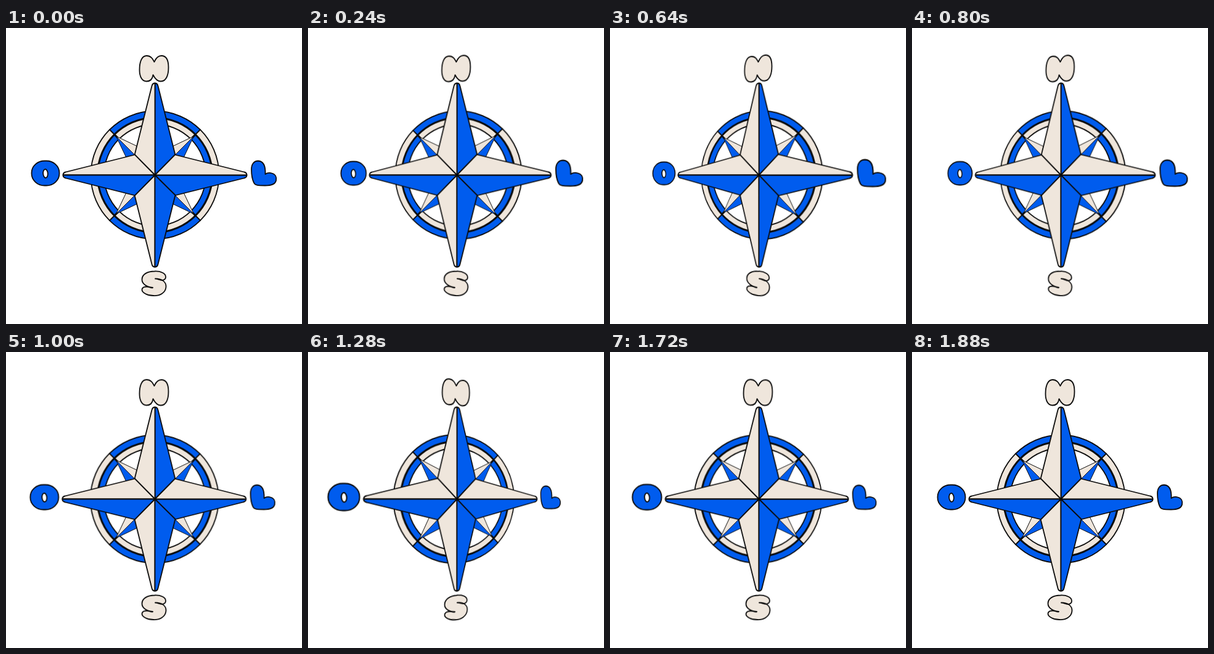
These frames come from a looping animation (480 px wide and 480 px high, 1.92 s). An HTML page:

```html
<!DOCTYPE html>
<html lang="en">
<head>
<meta charset="utf-8">
<title>Swaying compass</title>
<style>
html, body { margin: 0; width: 100%; height: 100%; overflow: hidden; background: #fff; }
svg { display: block; width: 480px; height: 480px; transform-origin: 241.5px 238.5px; }
</style>
</head>
<body>
<svg id="compass" viewBox="0 0 480 480" stroke="#0b0b0b" stroke-width="1.8" stroke-linejoin="round">
  <g id="rose" transform="translate(241.5 238.5)"></g>
  <g fill="#efe6dc">
    <path d="M228 45C235 45 238 50 240.500 55C243 49 247 45 252 45C260 45 263.500 53 263.500 64C263.500 76 260 86.500 251 86.500C245 86.500 241 81 238.500 76C237.500 83 234 86.500 228 86.500C220 86.500 216.500 78 216.500 68C216.500 55 220 45 228 45Z"/>
    <path d="M241 394.500C251 394 259 398 259 403.500C259 409 253 410 248 408Q244 406.500 242 406.500C252 406.500 260 411 259.500 420C258.500 430 249 434.500 239 434C229 434 220.500 429 220.500 424.500C220.500 419.500 228 418.500 233 420.500Q237 422 238 421C228 420 220.500 415 220.500 408C220.500 399 230 394.500 241 394.500Z"/>
  </g>
  <g fill="#005cee">
    <path d="M409 215.500C417 216 421 224 420.500 237C424 234.500 428 234.500 431 235.500C437 237 439 242 438 247C437 253 430 255.500 420 255.500C409 255.500 404 255.500 402 251C399 245 398 237 398 229C398 221 402 215.500 409 215.500Z"/>
    <rect x="41.500" y="215.500" width="45" height="40" rx="21" ry="19.500"/>
    <ellipse cx="64" cy="236" rx="3.800" ry="7" fill="#fff" transform="rotate(-5 64 236)"/>
  </g>
</svg>
<script>
const BLUE = '#005cee', BEIGE = '#efe6dc';
const compass = document.getElementById('compass');

const shape = (d, fill, turn, flip = 1, width = 1.8) =>
  `<path d="${d}" fill="${fill}" stroke-width="${width}" transform="rotate(${turn}) scale(${flip} 1)"/>`;

const sector = r => {
  const k = r * Math.SQRT1_2;
  return `M0 0L${-k} ${-k}A${r} ${r} 0 0 1 ${k} ${-k}Z`;
};

function drawRose() {
  const turns = [0, 90, 180, 270];
  const smallHalf = 'M0 0L0 -33L63 -63Z';
  const bigHalf = 'M0 0L33 -32.500L5 -144.500Q4 -149 0 -149Z';
  const ring = (r, colors, width) =>
    turns.map((a, i) => shape(sector(r), colors[i % 2], a, 1, width)).join('');

  let out = ring(104, [BLUE, BEIGE], 1.8) + ring(93, [BEIGE, BLUE], 3);
  out += '<circle r="82.5" fill="#fff"/>';
  // Each minor point: the upper half is light, the lower half dark.
  turns.forEach((a, i) => {
    out += shape(smallHalf, i < 2 ? BEIGE : BLUE, a, 1, 1);
    out += shape(smallHalf, i === 0 || i === 3 ? BEIGE : BLUE, a, -1, 1);
  });
  turns.forEach((a, i) => {
    out += shape(bigHalf, i < 2 ? BLUE : BEIGE, a);
    out += shape(bigHalf, i < 2 ? BEIGE : BLUE, a, -1);
  });
  document.getElementById('rose').innerHTML = out;
}

// Sway in degrees at 25 steps a second; the ends repeat the cycle for smooth slopes.
const keys = [
  [-5, -7.4], [0, 0], [12, 18.6], [15, 20.2], [20, 12.7], [25, -2.2],
  [28, -13], [32, -20.3], [38, -13.6], [42, -7.4], [47, 0], [59, 18.6]
];

const slope = i =>
  (keys[i + 1][1] - keys[i - 1][1]) / (keys[i + 1][0] - keys[i - 1][0]);

function sway(step) {
  let i = 1;
  while (i < keys.length - 3 && step > keys[i + 1][0]) i++;
  const [t0, a] = keys[i], [t1, b] = keys[i + 1];
  const span = t1 - t0, u = (step - t0) / span, v = 1 - u;
  return v * v * (1 + 2 * u) * a + u * u * (1 + 2 * v) * b
    + u * v * span * (v * slope(i) - u * slope(i + 1));
}

function frame() {
  const step = Math.floor(performance.now() % 1920 / 40);
  compass.style.transform = `perspective(680px) rotateY(${-sway(step % 47)}deg)`;
  requestAnimationFrame(frame);
}

drawRose();
frame();
</script>
</body>
</html>
```
